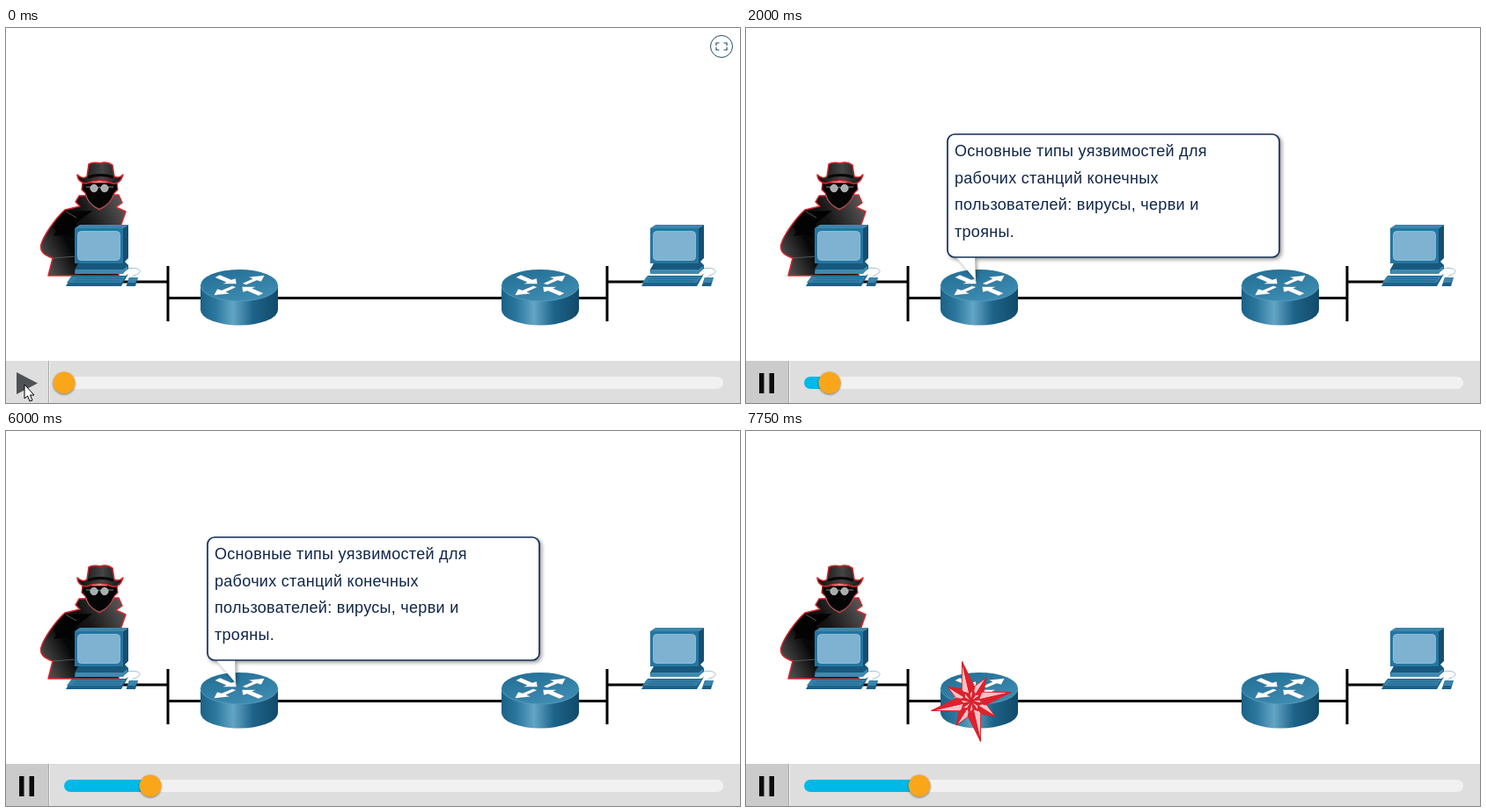
These frames come from a looping animation (834x427 px, 8 s). An HTML page:

```html
<!DOCTYPE html>
<html lang="ru">
<head>
<meta charset="utf-8">
<title>Уязвимости рабочих станций</title>
<style>
html, body { margin: 0; width: 100%; height: 100%; overflow: hidden; background: #fff; }
svg { display: block; width: 834px; height: 427px; }
.note { font: 18px "Liberation Sans", Arial, sans-serif; letter-spacing: .3px; fill: #10264a; }
#bubble { filter: drop-shadow(2px 2px 2px rgba(0, 0, 0, .4)); }
#knob { filter: drop-shadow(0 1px 1px rgba(0, 0, 0, .45)); }
</style>
</head>
<body>
<svg viewBox="0 0 834 427">
  <defs>
    <linearGradient id="side">
      <stop offset="0" stop-color="#1b6186"/><stop offset=".2" stop-color="#2c789f"/>
      <stop offset=".42" stop-color="#63a5c5"/><stop offset=".68" stop-color="#1d6389"/>
      <stop offset="1" stop-color="#124a69"/>
    </linearGradient>
    <linearGradient id="top" x2=".6" y2="1">
      <stop offset="0" stop-color="#1f6c94"/><stop offset="1" stop-color="#3f8cb2"/>
    </linearGradient>
    <linearGradient id="coat" x1="0" y1=".7" x2="1" y2=".2">
      <stop offset="0" stop-color="#4a4a4a"/><stop offset=".3" stop-color="#060606"/>
      <stop offset=".6" stop-color="#151515"/><stop offset="1" stop-color="#555"/>
    </linearGradient>
    <linearGradient id="hat">
      <stop offset="0" stop-color="#0c0c0c"/><stop offset=".55" stop-color="#444"/>
      <stop offset="1" stop-color="#111"/>
    </linearGradient>

    <g id="router">
      <path d="M-44 0V28A44 17.500 0 0 0 44 28V0Z" fill="url(#side)"/>
      <ellipse rx="44" ry="18" fill="url(#top)"/>
      <path d="M-44 0A44 18 0 0 0 44 0" fill="none" stroke="#5b9dbf" stroke-width=".8"/>
      <g id="arrows" fill="#fff" stroke="#1a5577" stroke-width=".4">
        <path d="M-28-9L-22-12L-9-6.500L-4-8L-3-1.500L-20-1.500L-15-3.500Z"/>
        <path d="M3-2L15-7.500L10-9.500L29-11.500L25-4L20-5.500L8-.5Z"/>
      </g>
      <use href="#arrows" transform="rotate(180)"/>
    </g>

    <g id="pc">
      <path d="M138 274C147 272 155 275 151 279C148 282 143 281 143 285" fill="none" stroke="#9dbdcd"/>
      <path d="M83 266H135L139 270V274L133 279H78V275Z" fill="#17587c"/>
      <path d="M79 275H133L138 271V274L133 280H78Z" fill="#3f8ab0"/>
      <path d="M75 282H136L139 280L131 294H68Z" fill="#1c6189"/>
      <path d="M74 283H136L131 290H69Z" fill="#3680a8"/>
      <path d="M79 285H132M76 288H129" stroke="#1f668e" fill="none"/>
      <path d="M78 228L84 224H139L133 228Z" fill="#3d86ab"/>
      <path d="M133 228L139 224V262L133 268Z" fill="#154f72"/>
      <path d="M78 228H133V268H78Z" fill="#2575a0"/>
      <rect x="81.500" y="231.500" width="48" height="33" rx="4" fill="#7fb2d0" stroke="#9cc6dc" stroke-width=".8"/>
      <path d="M140 284H150L147 294H136.500Z" fill="#1b5f86"/>
      <path d="M140 284H150L147 290H138Z" fill="#3c85ab"/>
    </g>
  </defs>

  <g id="spy" stroke="#d8262d" stroke-width="1.500" stroke-linejoin="round">
    <path fill="url(#coat)" d="M83 191L79 198L84 203L67 207C57 216 42 236 39.500 248C39 256 45 259 53 262L48 282H128V232L136 209L125 204L132 199L128 190Z"/>
    <path fill="#030303" stroke="none" d="M67 209L54 226L57 232L54 237L66 235L80 241V222L98 208Z"/>
    <path fill="none" stroke="#555" stroke-width="1" d="M68 209L80 216M53 262L80 260"/>
    <path fill="#050505" stroke-width="1.200" d="M87 176L86 184L90 188C92 198 98 203 106 207C115 203 121 198 123 188L127 184L126 176Z"/>
    <path fill="none" stroke="#8b8b8b" stroke-width=".8" d="M91 190C93 199 99 203 106 206C113 203 119 198 122 190"/>
    <path fill="url(#hat)" d="M81 167C85 171 89 171 92 169L94 155C99 152 103 153 107 154C112 152 117 153 121 156L123 169C127 171 130 170 133 167C131 174 127 178 121 177C112 173 101 173 91 177C86 177 81 173 81 167Z"/>
    <path fill="none" stroke="#060606" stroke-width="3" d="M93 170C102 167 113 167 122 170"/>
    <g fill="#a9adaf" stroke="#ddd" stroke-width=".6">
      <circle cx="100" cy="182.500" r="4.200"/><circle cx="112" cy="182.500" r="4.200"/>
      <path fill="none" d="M104 182Q106 180 108 182M91 181H96M116 181H122"/>
    </g>
  </g>

  <path d="M130 289H184M184 271V334M184 307.500H683M683 271V334M683 289H728" fill="none" stroke="#000" stroke-width="3"/>
  <use href="#pc"/>
  <use href="#pc" x="654"/>
  <use href="#router" x="265" y="293"/>
  <use href="#router" x="607" y="293"/>

  <g id="bubble">
    <path d="M238 260L261 287L260 260Z" fill="#fff"/>
    <rect x="229" y="121" width="377" height="140" rx="8" fill="#fff" stroke="#15305a" stroke-width="1.700"/>
    <text class="note">
      <tspan x="237" y="146">Основные типы уязвимостей для</tspan>
      <tspan x="237" y="177">рабочих станций конечных</tspan>
      <tspan x="237" y="207">пользователей: вирусы, черви и</tspan>
      <tspan x="237" y="238">трояны.</tspan>
    </text>
  </g>
  <g id="star" stroke="#d81f2a" stroke-width=".9" stroke-linejoin="round"></g>

  <g id="expand" fill="none" stroke="#234d66">
    <circle cx="813" cy="21" r="12.500"/>
    <path stroke-width="1.200" d="M807 20V17H810.500M815.500 17H819V20M819 22V25H815.500M810.500 25H807V22"/>
  </g>

  <rect y="379" width="834" height="48" fill="#dedede"/>
  <rect id="button" y="379" width="48" height="48" fill="#cbcbcb"/>
  <path d="M48.500 379V427" stroke="#aaa"/>
  <path d="M49.500 379V427" stroke="#f5f5f5"/>
  <path id="play" d="M12 392L36 404.500L12 417Z" fill="#4e5155"/>
  <path id="pause" d="M15 393H20.500V416H15ZM26.500 393H32V416H26.500Z" fill="#0c0c0c"/>
  <rect x="66" y="397" width="749" height="14" rx="7" fill="#f1f1f1"/>
  <rect id="fill" x="66" y="397" height="14" rx="7" fill="#00b9e8"/>
  <circle id="knob" cy="404" r="12.500" fill="#faa61a"/>
  <path id="cursor" d="M21 406V422L24.500 419L27 425L30 424L27.500 418H32Z" fill="#fff" stroke="#000"/>
</svg>
<script>
const LOOP = 8000, STEP = 250;
const $ = id => document.getElementById(id);
const show = (id, on) => { $(id).style.display = on ? '' : 'none'; };

// [time, knob x]
const knobPath = [[0, 66], [350, 66], [750, 73], [3250, 117], [4750, 145], [6000, 164], [7250, 186], [7750, 197]];
// [time, x, y, angle]
const starPath = [[7250, 180, 284, 8], [7500, 177, 286, -2], [7750, 256, 308, -13]];

function at(path, t) {
  const i = path.findIndex(p => p[0] > t);
  if (i < 0) return path[path.length - 1].slice(1);
  if (i === 0) return path[0].slice(1);
  const a = path[i - 1], b = path[i], k = (t - a[0]) / (b[0] - a[0]);
  return a.slice(1).map((v, j) => v + (b[j + 1] - v) * k);
}

function polar(r, deg) {
  const a = deg * Math.PI / 180;
  return (r * Math.sin(a)).toFixed(1) + ' ' + (-r * Math.cos(a)).toFixed(1);
}

function buildStar() {
  const half = (tip, r, a, d, color) =>
    `<path fill="${color}" d="M0 0L${polar(tip, a)}L${polar(r, a + d)}Z"/>`;
  const spikes = (tip, r, from, step, d) => {
    let s = '';
    for (let a = from; a < 360; a += step)
      s += half(tip, r, a, -d, '#f8c3c6') + half(tip, r, a, d, '#e0212c');
    return s;
  };
  $('star').innerHTML = spikes(32, 17, 45, 90, 22.5) + spikes(46.5, 17, 0, 90, 26) + spikes(13, 9, 22.5, 45, 22.5);
}

function draw(now) {
  const t = Math.floor(now % LOOP / STEP) * STEP;
  const [x] = at(knobPath, t);
  $('knob').setAttribute('cx', x);
  $('fill').setAttribute('width', x - 66);
  const playing = t >= 250;
  show('play', !playing);
  show('button', playing);
  show('pause', playing);
  show('cursor', t < 500);
  show('expand', t < 500);
  show('bubble', t >= 500 && t < 7000);
  show('star', t >= 7250);
  const [sx, sy, angle] = at(starPath, t);
  $('star').setAttribute('transform', `translate(${sx} ${sy}) rotate(${angle})`);
}

function tick() {
  draw(performance.now());
  requestAnimationFrame(tick);
}

buildStar();
tick();
</script>
</body>
</html>
```
